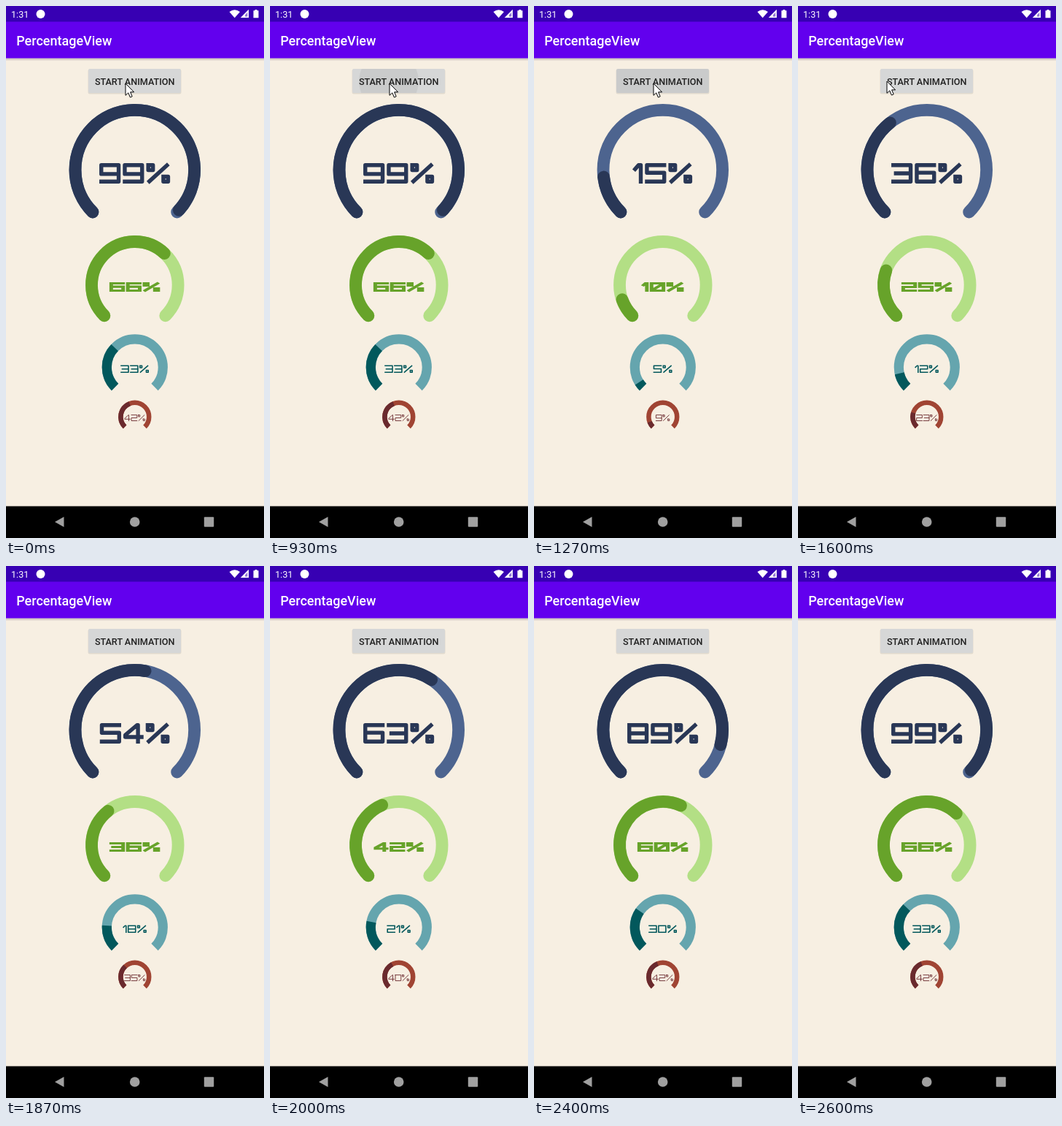
Animation of 354 by 728 pixels, one loop 3670 ms. Source, as an HTML page:

```html
<!DOCTYPE html>
<html lang="en">
<head>
<meta charset="utf-8">
<title>PercentageView</title>
<style>
  html, body { margin: 0; width: 100%; height: 100%; overflow: hidden; background: #f7efe2; }
  svg { display: block; width: 354px; height: 728px; }
  text { font-family: Roboto, "Open Sans", sans-serif; font-weight: 500; }
</style>
</head>
<body>
<svg viewBox="0 0 354 728">
  <defs>
    <linearGradient id="shade" x2="0" y2="1">
      <stop offset="0" stop-color="#000" stop-opacity=".2"/>
      <stop offset="1" stop-color="#000" stop-opacity="0"/>
    </linearGradient>
    <clipPath id="buttonClip"><rect x="113" y="86" width="127" height="33" rx="2"/></clipPath>
  </defs>
  <rect width="354" height="728" fill="#f7efe2"/>
  <rect y="71.5" width="354" height="4" fill="url(#shade)"/>
  <rect width="354" height="71.5" fill="#6200ee"/>
  <rect width="354" height="21.5" fill="#3700b3"/>

  <g fill="#fff">
    <text x="7" y="15.5" font-size="12.6" style="font-weight:400">1:31</text>
    <circle cx="47.5" cy="11" r="6"/>
    <path d="M306.5 8Q313.7 2.4 321 8L313.7 16.3Z"/>
    <path d="M333 4.8V16H321.8Z"/>
    <path d="M339.5 6.3H341.5V5H344.5V6.3H346.5V16.3H339.5Z"/>
    <text x="14.2" y="54" font-size="18">PercentageView</text>
  </g>
  <path d="M328 12.2L331.4 8.8V14.6H328Z" fill="#3700b3" opacity=".55"/>

  <rect x="112.5" y="86.5" width="128" height="34" rx="2.5" fill="#000" opacity=".09"/>
  <rect x="113" y="86" width="127" height="33" rx="2" fill="#d6d7d7"/>
  <circle id="ripple" cy="103" clip-path="url(#buttonClip)"/>
  <text x="176.7" y="107.6" font-size="12.62" fill="#212121" text-anchor="middle">START ANIMATION</text>

  <g id="dials" fill="none"></g>

  <rect y="684.5" width="354" height="43.5"/>
  <g fill="#a0a0a0">
    <path d="M67 706L79.5 699V713Z"/>
    <circle cx="176.7" cy="706" r="6.8"/>
    <rect x="271.8" y="699.3" width="13.4" height="13.4" rx="1"/>
  </g>
  <path id="cursor" d="M0 0V16.3L3.8 12.8L6.4 19L9.2 17.8L6.6 11.8H11.6Z" fill="#fff" stroke="#000" stroke-width="1"/>
</svg>
<script>
const LOOP = 3670, STEP = 1000 / 15, START = 1056;
const SVG = "http://www.w3.org/2000/svg";

// Glyph centre lines in a unit box: strokes split by "|", points by spaces.
const GLYPHS = {
  0: "0,0 1,0 1,1 0,1 0,0",
  1: "0,.24 .6,0 1,0 1,1",
  2: "0,0 1,0 1,.5 0,.5 0,1 1,1",
  3: "0,0 1,0 1,1 0,1|.15,.5 1,.5",
  4: "1,.72 0,.72 0,.6 .72,0 .78,0 .78,1",
  5: "1,0 0,0 0,.47 1,.47 1,1 0,1",
  6: "1,0 0,0 0,1 1,1 1,.46 0,.46",
  7: "0,0 1,0 1,1",
  8: "0,0 1,0 1,1 0,1 0,0|0,.5 1,.5",
  9: "1,.54 0,.54 0,0 1,0 1,1 0,1",
  "%": "0,0 .24,0 .24,.3 0,.3 0,0|.76,.7 1,.7 1,1 .76,1 .76,.7|.06,.98 .94,.02"
};
const WIDTHS = { 1: .45, 4: .95, 7: .85, "%": 1.12 };

const DIALS = [
  { cy: 224.2, r: 81.8, width: 16.8, cap: "round", ring: "#4d648f", bar: "#293756",
    goal: 99, time: 1500, top: 215, height: 28, digit: 29.2, gap: 3, stroke: 5.4, wide: 1, join: "round" },
  { cy: 381.8, r: 59.3, width: 16.8, cap: "round", ring: "#b3df85", bar: "#67a32a",
    goal: 66, time: 1500, top: 378, height: 13, digit: 21.3, gap: 1.5, stroke: 3.1, wide: 1.6, join: "miter", slash: true, bias: .07 },
  { cy: 494.3, r: 38.5, width: 13.2, cap: "butt", ring: "#65a5ae", bar: "#02585c",
    goal: 33, time: 1500, top: 491.5, height: 10.5, digit: 11.6, gap: 1.3, stroke: 1.6, wide: 1, join: "round" },
  { cy: 562.2, r: 19.4, width: 6.5, cap: "butt", ring: "#a04433", bar: "#6a2a2e",
    goal: 42, time: 1000, top: 559.2, height: 8.8, digit: 8.6, gap: 1, stroke: .9, wide: 1, join: "round" }
];
const CX = 176.8;
const byId = id => document.getElementById(id);
const clamp = x => Math.max(0, Math.min(1, x));

function add(parent, tag, attrs) {
  const node = parent.appendChild(document.createElementNS(SVG, tag));
  for (const key in attrs) node.setAttribute(key, attrs[key]);
  return node;
}

function arc({ cy, r }, percent) {
  const point = deg => {
    const a = deg * Math.PI / 180;
    return `${CX + r * Math.cos(a)} ${cy + r * Math.sin(a)}`;
  };
  const sweep = 2.7 * percent;
  return `M${point(135)}A${r} ${r} 0 ${sweep > 180 ? 1 : 0} 1 ${point(135 + sweep)}`;
}

function label(dial, string) {
  const { digit, gap, stroke, wide, height, slash } = dial;
  const chars = [...string];
  const widthOf = c => digit * (WIDTHS[c] || 1);
  const total = chars.reduce((sum, c) => sum + widthOf(c) + gap, -gap);
  const inset = stroke / 2;
  let left = -total / 2, d = "";
  for (const c of chars) {
    const w = widthOf(c) / wide - stroke, h = height - stroke;
    const shape = GLYPHS[c] + (slash && c === "0" ? "|.1,.9 .9,.1" : "");
    for (const line of shape.split("|")) {
      d += "M" + line.split(" ").map(p => {
        const [x, y] = p.split(",").map(Number);
        return `${(left / wide + inset + x * w).toFixed(2)} ${(inset + y * h).toFixed(2)}`;
      }).join("L");
    }
    left += widthOf(c) + gap;
  }
  return d;
}

for (const dial of DIALS) {
  const line = { "stroke-width": dial.width, "stroke-linecap": dial.cap };
  add(byId("dials"), "path", { ...line, stroke: dial.ring, d: arc(dial, 100) });
  dial.arcNode = add(byId("dials"), "path", { ...line, stroke: dial.bar });
  dial.textNode = add(byId("dials"), "path", {
    stroke: dial.bar, "stroke-width": dial.stroke, "stroke-linecap": "square",
    "stroke-linejoin": dial.join, role: "img",
    transform: `translate(${CX - .2} ${dial.top}) scale(${dial.wide} 1)`
  });
}

function drawDial(dial, t) {
  const progress = t < START ? 1 : clamp((t - START) / dial.time);
  const value = dial.goal * progress;
  const string = Math.min(dial.goal, Math.ceil(value + (dial.bias || 0) - 1e-6)) + "%";
  dial.arcNode.setAttribute("d", arc(dial, value));
  dial.textNode.setAttribute("d", label(dial, string));
  dial.textNode.setAttribute("aria-label", string);
}

function drawRipple(t) {
  const grow = Math.max(0, t - 930);
  const ripple = byId("ripple");
  ripple.setAttribute("cx", 163 + 13 * clamp(grow / 140));
  ripple.setAttribute("r", 41 + grow * .5);
  ripple.setAttribute("opacity", t < 930 ? 0 : .055 * clamp((1400 - t) / 130));
}

function drawCursor(t) {
  const p = clamp((t - 1470) / 130) ** 2;
  const cursor = byId("cursor");
  cursor.setAttribute("transform", `translate(${164 - 42 * p} ${106 - 3 * p})`);
  cursor.setAttribute("visibility", t > 1600 && t < LOOP ? "hidden" : "visible");
}

function render(ms) {
  const step = Math.floor((ms % LOOP + 4) / STEP);
  const t = Math.round(step * STEP / 10) * 10;
  for (const dial of DIALS) drawDial(dial, t);
  drawRipple(t);
  drawCursor(t);
}

const begin = performance.now();
function tick() {
  render(performance.now() - begin);
  requestAnimationFrame(tick);
}
tick();
</script>
</body>
</html>
```
